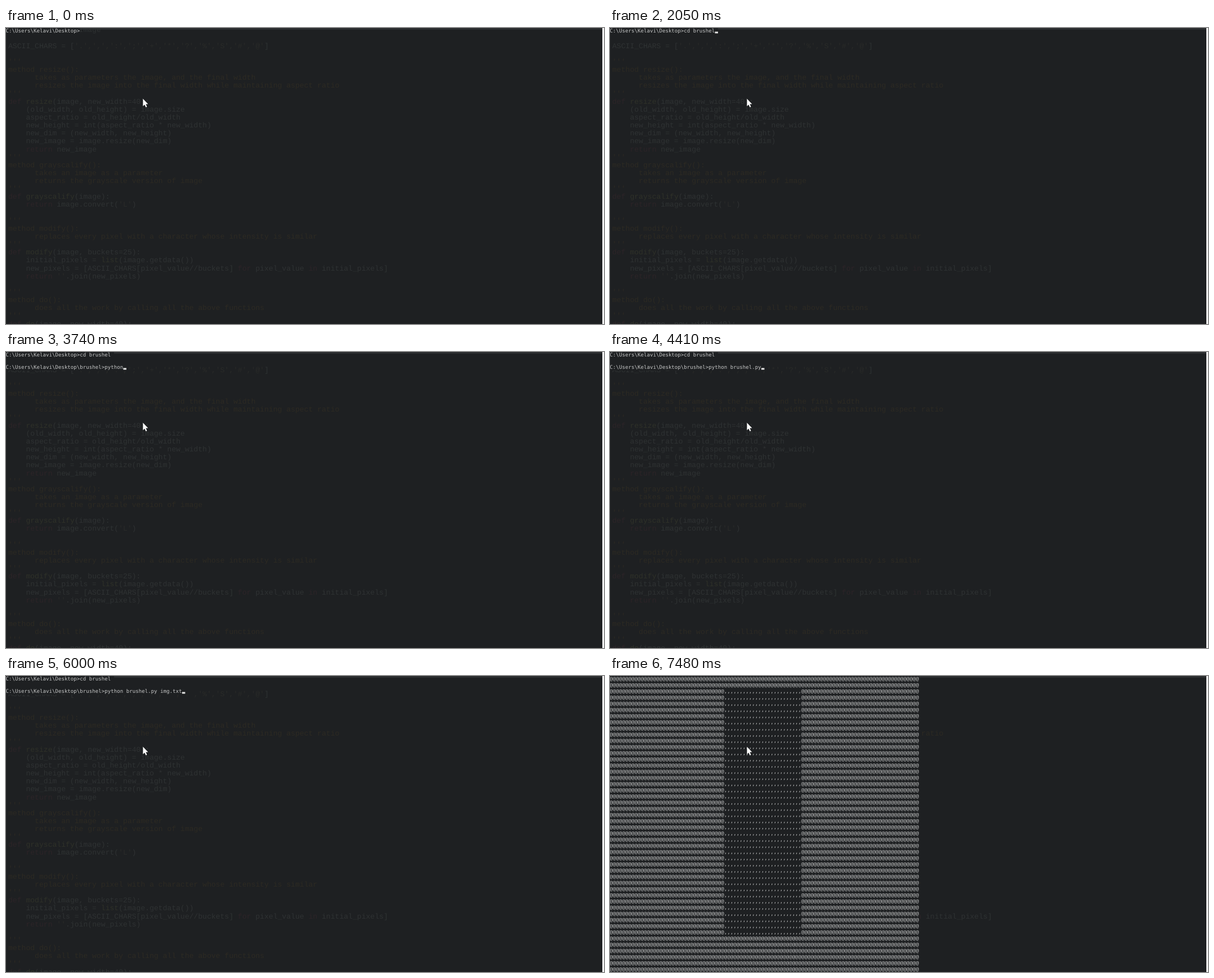
Recreate the animation shown at these times as an HTML page. Size 1063 by 527 pixels, loop 8000 ms.

```html
<!DOCTYPE html>
<html lang="en">
<head>
<meta charset="utf-8">
<title>Terminal</title>
<style>
  html, body { margin: 0; width: 100%; height: 100%; overflow: hidden; background: #1e2022; }
  svg { display: block; }
  text { white-space: pre; text-rendering: geometricPrecision; }
  #code { font: 13.09px "Liberation Mono", monospace; fill: #2f3233; }
  #code .doc { fill: #2d2a23; }
  #code .key { fill: #2d2428; }
  #code .fn { fill: #2f3129; }
  #code .str { fill: #2a2b29; }
  #term { font: 9.136px "DejaVu Sans Mono", monospace; fill: #c4c5c5; }
  .paper { fill: #1e2022; }
</style>
</head>
<body>
<svg width="1063" height="527" viewBox="0 0 1063 527">
  <rect class="paper" width="1063" height="527"/>
  <rect width="1060" height="3" fill="#2c2e30"/>
  <rect x="1060" width="3" height="527" fill="#f0f0f0"/>
  <g id="code"></g>
  <g id="term"></g>
  <path d="M243.5 126v13.2l3-2.8 2.1 4.8 2-.9-2.1-4.7h4z" fill="#fff"/>
</svg>
<script>
const LOOP = 8000, CELL = 5.5, ROW = 11, LEFT = -0.5;
const code = document.getElementById('code'), term = document.getElementById('term');

function add(parent, tag, attrs = {}, content = '') {
  const el = document.createElementNS('http://www.w3.org/2000/svg', tag);
  for (const name in attrs) el.setAttribute(name, attrs[name]);
  el.textContent = content;
  return parent.appendChild(el);
}

// Faint editor text showing through; markers: ~ doc, ! keyword, @ function, $ string.
const styles = { '~': 'doc', '!': 'key', '@': 'fn', '$': 'str' };
const chars = [...'.,:;+*?%S#@'].map(c => `'${c}'`).join(',');
const quote = ["~'''"];
const listing = [
  [' '.repeat(16) + 'Image'], [],
  ['ASCII_CHARS = [', '$' + chars, ']'], [],
  quote, ['~method resize():'],
  ['~      takes as parameters the image, and the final width'],
  ['~      resizes the image into the final width while maintaining aspect ratio'],
  quote, ['!def ', '@resize', '(image, new_width=40):'],
  ['    (old_width, old_height) = image.size'],
  ['    aspect_ratio = old_height/old_width'],
  ['    new_height = int(aspect_ratio * new_width)'],
  ['    new_dim = (new_width, new_height)'],
  ['    new_image = image.resize(new_dim)'],
  ['!    return ', 'new_image'],
  quote, ['~method grayscalify():'],
  ['~      takes an image as a parameter'],
  ['~      returns the grayscale version of image'],
  quote, ['!def ', '@grayscalify', '(image):'],
  ['!    return ', 'image.convert(', "$'L'", ')'], [],
  quote, ['~method modify():'],
  ['~      replaces every pixel with a character whose intensity is similar'],
  quote, ['!def ', '@modify', '(image, buckets=25):'],
  ['    initial_pixels = ', '@list', '(image.getdata())'],
  ['    new_pixels = [ASCII_CHARS[pixel_value//buckets]', '! for ', 'pixel_value', '! in ', 'initial_pixels]'],
  ['!    return ', "$''", '.join(new_pixels)'], [],
  quote, ['~method do():'],
  ['~      does all the work by calling all the above functions'],
  quote, ['!def ', '@do', '(image, new_width=40):']
];
listing.forEach((parts, i) => {
  const line = add(code, 'text', { x: 4, y: 7.4 + i * 14.14 });
  for (const part of parts) {
    const style = styles[part[0]];
    add(line, 'tspan', style ? { class: style } : {}, style ? part.slice(1) : part);
  }
});

// Console rows are opaque and keep covering what they once covered.
const home = 'C:\\Users\\Kelavi\\Desktop', tool = 'brushel';
const enter = 'cd ' + tool, run = `python ${tool}.py`;
const prompts = { 0: home + '>', 2: `${home}\\${tool}>`, 3: '' };
const steps = [
  [0, 0, '', false], [750, 0, 'c'], [910, 0, 'cd'], [1340, 0, 'cd '],
  [1900, 0, enter.slice(0, 5)], [2050, 0, enter],
  [2490, 2, ''], [3050, 2, 'p'], [3320, 2, 'py'], [3450, 2, 'pyth'],
  [3590, 2, 'pytho'], [3740, 2, 'python'], [3890, 2, 'python '],
  [4020, 2, run.slice(0, 8)], [4140, 2, run.slice(0, 10)],
  [4410, 2, run], [4990, 2, run, false], [5150, 2, run + ' '],
  [5450, 2, enter], [5580, 2, run + ' output.txt'],
  [6000, 2, run + ' img.txt'], [6400, 2, run + ' drawing.png'],
  [7090, 2, run + ' drawing.png', false], [7230, 3, '']
];
const PICTURE_AT = 7480;

function makeRow(row) {
  const cover = add(term, 'rect', { class: 'paper', x: 0, y: row * ROW, height: ROW });
  const text = add(term, 'text', { x: LEFT, y: row * ROW + 7.5 });
  return { cover, text };
}
const rows = { 0: makeRow(0), 2: makeRow(2) };
const caret = add(term, 'rect', { width: CELL, height: 3, fill: '#e4e4e4' });

// Character picture: one plain block of commas in a field of @.
const picture = add(term, 'g');
add(picture, 'rect', { class: 'paper', width: 549.5, height: 527 });
for (let r = 0; r < 48; r++) {
  const block = r >= 2 && r <= 41;
  const line = block ? '@'.repeat(37) + ','.repeat(25) + '@'.repeat(38) : '@'.repeat(100);
  add(picture, 'text', { x: LEFT, y: r * ROW + 7.5 }, line);
}

function render(t) {
  const past = steps.filter(s => s[0] <= t);
  const [, row, typed, caretOn = true] = past[past.length - 1];
  for (const key in rows) {
    const own = past.filter(s => s[1] == key);
    const { cover, text } = rows[key];
    const cells = Math.max(0, ...own.map(s => prompts[key].length + s[2].length + (s[3] === false ? 0 : 1)));
    cover.setAttribute('width', Math.max(0, cells * CELL + LEFT));
    text.textContent = own.length ? prompts[key] + own[own.length - 1][2] : '';
  }
  caret.setAttribute('x', LEFT + (prompts[row].length + typed.length) * CELL);
  caret.setAttribute('y', row * ROW + 6.5);
  caret.style.display = caretOn ? '' : 'none';
  picture.style.display = t >= PICTURE_AT ? '' : 'none';
}

const start = performance.now();
function tick() {
  render((performance.now() - start) % LOOP);
  requestAnimationFrame(tick);
}
tick();
</script>
</body>
</html>
```
